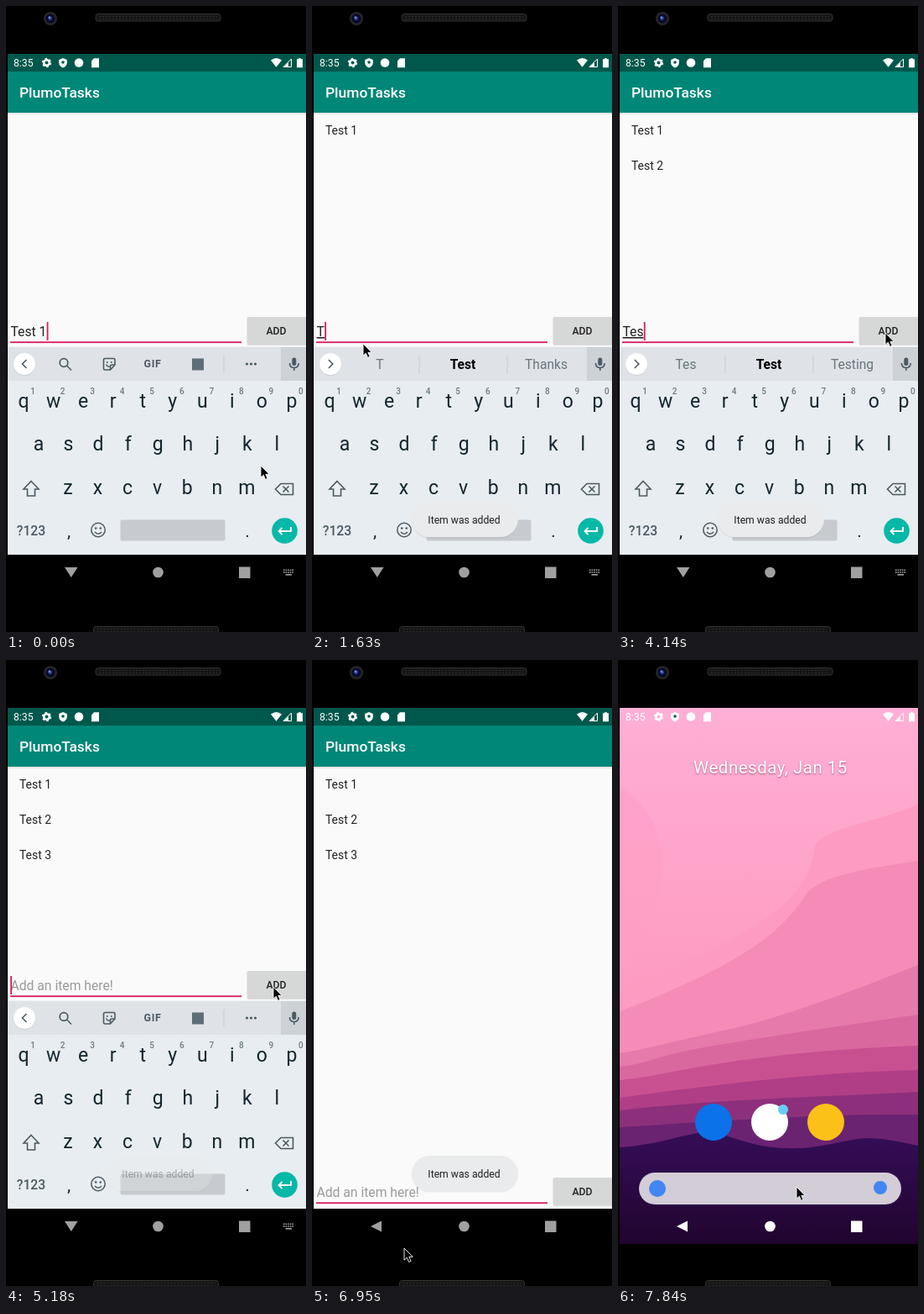
Recreate the animation shown at these times as an HTML page. Size 358 px wide and 745 px high, loop 7990 ms.

```html
<!DOCTYPE html>
<html lang="en">
<head>
<meta charset="utf-8">
<title>Todo demo</title>
<style>
  html, body { margin: 0; width: 100%; height: 100%; overflow: hidden; background: #000; }
  svg { display: block; width: 358px; height: 745px; font-family: Roboto, sans-serif; }
  text { white-space: pre; }
  .mid { text-anchor: middle; }
  .line { fill: none; stroke: #4b5a62; stroke-width: 1.6; }
</style>
</head>
<body>
<svg id="stage" viewBox="0 0 358 745"></svg>
<script>
const TICK = 148, LOOP = 7990;

// Timelines, in ticks
const typed = [[0, 'Test 1'], [5, ''], [11, 'T'], [12, 'Te'], [13, 'Tes'], [14, 'Test'], [15, 'Test 2'],
  [21, ''], [26, 'T'], [27, 'Te'], [28, 'Tes'], [29, 'Test'], [30, 'Test '], [31, 'Test 3'], [35, '']];
const added = [5, 21, 35];
const pressed = [4, 20, 34];
const mouseX = [[0, 304], [3, 320], [5, 320], [8, 61], [15, 61], [16, 120], [17, 220], [18, 297], [19, 297],
  [20, 319], [35, 319], [42, 76], [45, 76], [47, 110], [49, 176], [51, 176], [53, 213]];
const mouseY = [[0, 547], [3, 387], [5, 387], [8, 402], [15, 402], [16, 376], [17, 361], [18, 375], [19, 375],
  [20, 389], [35, 389], [42, 676], [45, 676], [47, 700], [49, 675], [51, 675], [53, 627]];
const toastFade = [[4, 0], [6, 1], [19, 1], [20, .3], [22, 1], [34, 1], [35, .3], [37, 1], [49, 1], [51, .13], [52, 0]];
const keysDrop = [[43, 0], [44, 60], [45, 185], [46, 250]];
const appDrop = [[50, 0], [51, 32], [52, 80]];
const appFade = [[50, 1], [51, .975], [52, .4], [53, 0]];
const backGlow = [[42, 0], [43, .14], [44, .14], [46, 0]];
const homeGlow = [[49, 0], [50, .14], [51, .1], [52, 0]];
const thirdWord = { T: 'Thanks', Te: 'Testing', Tes: 'Testing', Test: 'Testing' };

function ramp(keys, n) {
  const i = keys.findIndex(k => k[0] > n);
  if (i === 0) return keys[0][1];
  if (i < 0) return keys[keys.length - 1][1];
  const [a, va] = keys[i - 1], [b, vb] = keys[i];
  return va + (vb - va) * (n - a) / (b - a);
}
const latest = (keys, n) => keys.filter(k => k[0] <= n).pop();

// Markup helpers
const rect = (x, y, w, h, fill, more = '') =>
  `<rect x="${x}" y="${y}" width="${w}" height="${h}" fill="${fill}" ${more}/>`;
const disc = (x, y, r, fill, more = '') => `<circle cx="${x}" cy="${y}" r="${r}" fill="${fill}" ${more}/>`;
const path = (d, fill, more = '') => `<path d="${d}" fill="${fill}" ${more}/>`;
const line = (d, more = '') => `<path class="line" d="${d}" ${more}/>`;
const label = (x, y, size, fill, str, more = '') =>
  `<text x="${x}" y="${y}" font-size="${size}" fill="${fill}" ${more}>${str}</text>`;
const mid = (x, y, size, fill, str, more = '') => label(x, y, size, fill, str, 'class="mid" ' + more);
const group = (id, body, more = '') => `<g id="${id}" ${more}>${body}</g>`;

function phone() {
  const grille = (x, y) => rect(x, y, 149, 8.5, '#151515', 'rx="3" stroke="#333"') +
    `<path d="M${x + 4} ${y + 3}h141M${x + 4} ${y + 6}h141" stroke="#2e2e2e" stroke-dasharray="2 2"/>`;
  return grille(107, 9.5) + grille(104.5, 738.5) + disc(53, 15, 8, '#262626') +
    disc(53, 15, 5.5, '#080b2c') + disc(52.5, 14.5, 2.2, '#3a4fa8') + disc(51.7, 13.5, .9, '#9fb0ee');
}

function wallpaper() {
  const bands = [
    ['#fe9bc2', 'M358 172C300 196 245 200 235 222C228 285 165 318 110 345S30 395 2 402'],
    ['#f48cb7', 'M358 239C300 248 245 255 225 278C190 335 125 368 24 410L2 418'],
    ['#e67aab', 'M358 363C290 390 200 425 130 440S40 462 2 468'],
    ['#d9689f', 'M358 422C290 432 200 445 120 458S40 480 2 484'],
    ['#c95090', 'M358 459C270 462 180 470 110 482S40 496 2 500'],
    ['#b03e86', 'M358 488C260 490 150 500 2 521'],
    ['#8d307b', 'M358 514C250 520 120 522 2 536'],
    ['#6a2371', 'M358 541C240 540 130 548 2 556'],
    ['url(#hill)', 'M358 578C330 572 305 567 285 570C255 575 230 583 200 581C160 580 135 566 110 561C80 563 50 577 2 580']
  ];
  return rect(2, 57, 356, 638, 'url(#sky)') +
    path('M2 150C60 190 62 250 40 300S15 380 2 400Z', '#ff9fc6', 'opacity=".6"') +
    bands.map(([fill, d]) => path(d + 'V695H358Z', fill)).join('');
}

function home() {
  return wallpaper() +
    mid(182, 134.5, 20.5, '#fff', 'Wednesday, Jan 15',
      'letter-spacing=".5" style="text-shadow:0 1px 2px rgba(90,20,60,.55)"') +
    disc(114, 550, 22, '#0b72ea') + disc(181, 550, 22, '#fff') + disc(197, 535, 6, '#68cdf5') +
    disc(248, 550, 22, '#fbc116') +
    rect(25, 610, 313, 38, '#d2cdd6', 'rx="19"') + disc(47, 629, 10, '#4285f4') + disc(313, 628, 8, '#4285f4');
}

function app() {
  const rows = [1, 2, 3].map(i =>
    label(16, 111 + 42 * i, 13.9, '#212121', 'Test ' + i, `id="item${i}"`)).join('');
  const form = rect(5, 399.3, 276, 1.8, '#d81b60') +
    label(5.5, 393, 15.7, '#9a9a9a', 'Add an item here!', 'id="hint"') +
    label(5.5, 393, 15.7, '#212121', '', 'id="entry"') +
    rect(0, 376, 1.8, 22, '#d81b60', 'id="caret"') +
    rect(288, 402, 70, 2, '#000', 'opacity=".12"') +
    rect(287.5, 370, 72, 33, '#d6d7d7', 'rx="2" id="button"') +
    mid(322.5, 390.6, 12.2, '#212121', 'ADD', 'font-weight="500"');
  return rect(2, 57, 356, 596, '#fafafa') + rect(2, 127, 356, 2, '#000', 'opacity=".08"') +
    rect(2, 57, 356, 21, '#00574b') + rect(2, 78, 356, 49, '#008777') +
    label(16, 109, 17.4, '#fff', 'PlumoTasks', 'font-weight="500"') + rows + group('form', form);
}

function statusBar() {
  const gear = disc(48.5, 67.5, 3.3, 'none', 'stroke="#fff" stroke-width="2.6"') +
    disc(48.5, 67.5, 4.9, 'none', 'stroke="#fff" stroke-width="1.6" stroke-dasharray="2.6 2.53"');
  return label(9, 72.3, 12.2, '#fff', '8:35') + gear +
    path('M68 62l4.8 2v3.4q0 4-4.8 6-4.8-2-4.8-6V64Z', '#fff') + disc(68, 67, 1.8, '#00574b') +
    disc(87, 67.5, 5.3, '#fff') +
    path('M105 62.2h6v11h-9v-8Z', '#fff') +
    path('M316 64.5q6.5-5 13 0l-6.5 8.3Z', '#fff') +
    path('M340.5 63v9.5H331Z', 'none', 'stroke="#fff"') + path('M337 67v5.5h-5.5Z', '#fff') +
    path('M347 63.2h2v-1h3v1h2v10h-7Z', '#fff');
}

function keyboard() {
  const ink = '#12262e', soft = '#4b5a62';
  const row = (str, x, y) => [...str].map((c, i) => mid(x + 35.55 * i, y, 23, ink, c)).join('');
  const digits = [...'1234567890'].map((c, i) =>
    mid(32 + 35.55 * i, 461.5, 10, '#6c7a82', c, 'font-weight="500"')).join('');
  const tools = line('M24.5 421l-5 5 5 5') +
    disc(69, 424.5, 4.8, 'none', `stroke="${soft}" stroke-width="1.7"`) + line('M72.5 428l5.5 5.5', 'stroke-width="2"') +
    line('M118 419.5h10.5q1.5 0 1.5 1.5v6l-5.5 6h-6.5q-1.5 0-1.5-1.5V421q0-1.5 1.5-1.5ZM130 427h-3.5q-2 0-2 2v4M119.5 426.5q1.5 3.2 4 2.6') +
    disc(120.8, 424, 1, soft) + disc(125.8, 424, 1, soft) +
    mid(175, 430.3, 12.5, soft, 'GIF', 'font-weight="700" letter-spacing=".6"') +
    rect(222, 419.5, 14, 14, '#5f6d75') + rect(259.5, 416, 1, 20, '#c6cbcf') +
    [287.5, 292.5, 297.5].map(x => disc(x, 426, 1.6, soft)).join('');
  const words = line('M19.8 421l5 5-5 5') + rect(127.5, 416, 1, 21, '#c6cbcf') + rect(232.5, 416, 1, 21, '#c6cbcf') +
    mid(81, 432, 15.6, '#68757d', '', 'id="word1"') +
    mid(180, 432, 15.6, '#000', 'Test', 'font-weight="700"') +
    mid(279.5, 432, 15.6, '#68757d', '', 'id="word3"');
  return rect(2, 405.5, 356, 248, '#e8edf1') + rect(2, 406, 356, 40, '#dfe3e7') +
    rect(328, 406, 30, 40, '#cdd2d6') + disc(22, 426.6, 13.3, '#b9bec2', 'opacity=".5"') + disc(22, 426, 13, '#fff') +
    group('tools', tools) + group('words', words) +
    rect(341.3, 418.5, 5, 9.5, soft, 'rx="2.5"') + line('M338.5 425q0 5.5 5.3 5.5t5.3-5.5M343.8 430.5v3.5') +
    row('qwertyuiop', 21, 478) + digits + row('asdfghjkl', 39, 529) + row('zxcvbnm', 74, 581) +
    line('M30 565.5l9 9.5h-4.5v8h-9v-8H21Z') +
    line('M328 568.5h14.5v13H328l-6.5-6.5ZM330.5 571.5l7 7M337.5 571.5l-7 7') +
    mid(30, 629.5, 15.7, soft, '?123', 'font-weight="500"') +
    mid(75, 632, 21, ink, ',') + mid(288, 632, 21, ink, '.') +
    disc(110, 623.5, 8.2, 'none', `stroke="${soft}" stroke-width="1.5"`) + line('M106 626q4 4.4 8 0') +
    disc(107.2, 621.5, 1.3, soft) + disc(112.8, 621.5, 1.3, soft) +
    rect(136.5, 611.5, 125, 25, '#c7cbcf', 'rx="2"') +
    disc(332.5, 624.5, 15.3, '#06b8a7') +
    path('M340 620v5h-14M329.5 621l-4 4 4 4', 'none', 'stroke="#fff" stroke-width="1.8"');
}

function nav() {
  const dots = [0, 1, 2, 3, 4].map(i => [0, 1].map(j => rect(331 + 2.6 * i, 670.5 + 2.7 * j, 1.6, 1.6, '#a0a0a0')).join('')).join('');
  return rect(43, 653, 69, 42, '#fff', 'rx="21" id="backGlow"') +
    rect(137, 653, 91, 42, '#888', 'rx="21" id="homeGlow"') +
    group('navIcons', path('M70 668h15.5l-7.7 12Z', 'inherit', 'id="hideKeys"') +
      path('M83 667.5v13l-13-6.5Z', 'inherit', 'id="goBack"') +
      disc(181.5, 674, 6.3, 'inherit') + rect(278, 667.5, 13.5, 13.5, 'inherit')) +
    group('keysIcon', dots + rect(333.5, 676, 7.5, 1.6, '#a0a0a0'));
}

const stage = document.getElementById('stage');
stage.innerHTML = `<defs>
  <linearGradient id="sky" x1="0" y1="0" x2="0" y2="1"><stop stop-color="#ffafd5"/><stop offset=".25" stop-color="#ffa5cb"/><stop offset=".6" stop-color="#fd98bf"/></linearGradient>
  <linearGradient id="hill" x1="0" y1="0" x2="0" y2="1"><stop stop-color="#350d58"/><stop offset="1" stop-color="#21042f"/></linearGradient>
  <clipPath id="screen">${rect(2, 57, 356, 638, '#000')}</clipPath>
  <clipPath id="above">${rect(2, 57, 356, 596, '#000')}</clipPath>
</defs>` + rect(0, 0, 358, 745, '#000') + phone() +
  group('view', group('home', home()) + rect(2, 653, 356, 42, '#000', 'id="navBack"') + group('app', app()) +
    `<g clip-path="url(#above)">${group('keys', keyboard())}</g>` + statusBar() + nav() +
    group('toast', rect(119, 591.5, 127, 42, '#000', 'rx="21" opacity=".06"') +
      rect(119, 590, 127, 42, '#e9ebec', 'rx="21"') + mid(181.5, 615.5, 12.2, '#1f1f1f', 'Item was added')),
    'clip-path="url(#screen)"') +
  group('mouse', path('M0 0V14.2L3.3 11.2 5.6 16.4 8.1 15.3 5.8 10.3H10.2Z', '#000', 'stroke="#fff" stroke-width=".9"'));

const el = {};
stage.querySelectorAll('[id]').forEach(e => el[e.id] = e);
const set = (id, name, value) => el[id].setAttribute(name, value);
const show = (id, on) => set(id, 'visibility', on ? 'visible' : 'hidden');
const fade = (id, v) => set(id, 'opacity', v);
const move = (id, x, y) => set(id, 'transform', `translate(${x} ${y})`);

function draw(n) {
  const [since, text] = latest(typed, n);
  const composing = text in thirdWord;
  el.entry.textContent = text;
  set('entry', 'text-decoration', composing ? 'underline' : 'none');
  show('hint', !text);
  set('caret', 'x', text ? 5.8 + el.entry.getComputedTextLength() : 5.2);
  show('caret', (n - since) * TICK % 1000 < 500);
  show('tools', !composing);
  show('words', composing);
  el.word1.textContent = text;
  el.word3.textContent = thirdWord[text] || '';

  added.forEach((at, i) => show('item' + (i + 1), n >= at));
  set('button', 'fill', pressed.includes(n) ? '#bdbebe' : '#d6d7d7');
  fade('toast', ramp(toastFade, n));

  move('form', 0, n >= 45 ? 246 : 0);
  move('keys', 0, ramp(keysDrop, n));
  show('keys', n < 46);
  move('app', 0, ramp(appDrop, n));
  fade('app', ramp(appFade, n));
  show('home', n >= 51);
  show('navBack', n < 52);

  set('navIcons', 'fill', n >= 51 ? '#fff' : '#a0a0a0');
  show('hideKeys', n < 45);
  show('goBack', n >= 45);
  show('keysIcon', n < 45);
  fade('backGlow', ramp(backGlow, n));
  fade('homeGlow', ramp(homeGlow, n));
  move('mouse', ramp(mouseX, n), ramp(mouseY, n));
}

const start = performance.now();
let shown = -1;
function frame() {
  const t = (performance.now() - start) % LOOP;
  const n = Math.min(53, Math.floor((t + 10) / TICK));
  if (n !== shown) draw(shown = n);
  requestAnimationFrame(frame);
}
frame();
</script>
</body>
</html>
```
